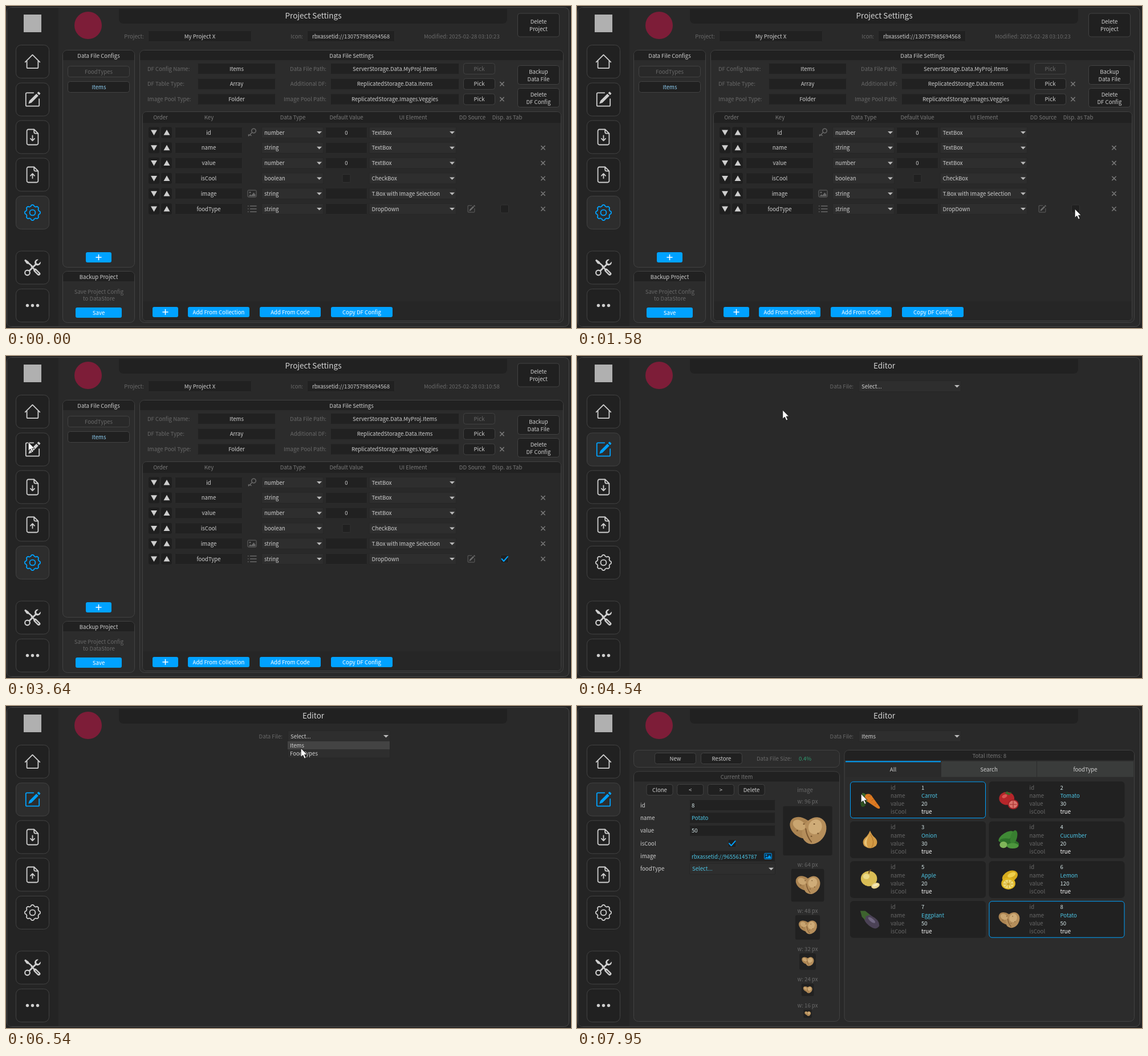
An HTML page for the animation above (7.99 s loop, 991x565 px).

```html
<!DOCTYPE html>
<html lang="en">
<head>
<meta charset="utf-8">
<title>Project editor</title>
<style>
html, body { margin: 0; width: 100%; height: 100%; overflow: hidden; background: #292929; }
svg { display: block; width: 991px; height: 565px; }
text { font-family: "Noto Sans CJK JP", "Noto Sans CJK SC", "Noto Sans CJK KR", "Noto Sans", sans-serif; white-space: pre; }
</style>
</head>
<body>
<svg viewBox="0 0 991 565">
  <g id="scene"></g>
  <path id="cursor" d="M-.8-1V14.5L2.8 11.2 5.5 17.2 8.1 16 5.5 10.2H10.2Z" fill="#fff" stroke="#111" stroke-width=".8"/>
</svg>
<script>
const LOOP = 7990;
const BLUE = '#00a2ff', CYAN = '#4cc4e4', LIGHT = '#cfcfcf', DIM = '#696969', DARK = '#212121', EDGE = '#424242', MENU = '#2e2e2e';
const ROW = 26.8;

// Moments when the interface changes
const CHECKED = 2220, EDITOR = 3890, LIST_OPEN = 5330, HOVER_LIST = 5700, PICKED = 6580, CARDS = 7030;

// Pointer keys: time, x, y
const KEYS = [
  [530, 545, 582], [700, 640, 500], [1000, 800, 402], [1360, 881, 361], [1580, 874, 357], [2220, 874, 357],
  [2480, 862, 385], [2760, 839, 404], [3000, 705, 400], [3300, 340, 230], [3500, 90, 117], [3640, 40, 152],
  [3890, 40, 152], [4200, 165, 146], [4540, 361, 96], [4700, 448, 73], [5000, 515, 52], [5200, 534, 45],
  [5490, 517, 57], [6080, 517, 66], [6240, 517, 66], [6370, 518, 75], [7200, 518, 75], [7550, 511, 116], [7950, 499, 155]
];

const rect = (x, y, w, h, r = 0, fill = 'none', stroke = 'none') =>
  `<rect x="${x}" y="${y}" width="${w}" height="${h}" rx="${r}" fill="${fill}" stroke="${stroke}"/>`;
const text = (x, y, s, fill = LIGHT, anchor = 'middle', size = 9.6) =>
  `<text x="${x}" y="${y + size * .37}" fill="${fill}" text-anchor="${anchor}" font-size="${size}">${s}</text>`;
const left = (x, y, s, fill) => text(x, y, s, fill, 'start');
const line = (d, color = LIGHT, w = 1) =>
  `<path d="${d}" fill="none" stroke="${color}" stroke-width="${w}" stroke-linejoin="round" stroke-linecap="round"/>`;
const shape = (d, fill) => `<path d="${d}" fill="${fill}"/>`;
const oval = (x, y, rx, ry, fill, turn = 0) =>
  `<ellipse rx="${rx}" ry="${ry}" fill="${fill}" transform="translate(${x} ${y}) rotate(${turn})"/>`;
const at = (x, y, body, scale = 1) => `<g transform="translate(${x} ${y}) scale(${scale})">${body}</g>`;
// Icons are drawn on a 16 unit grid
const icon = (x, y, body, scale = 1.8) => at(x - 8 * scale, y - 8 * scale, body, scale);

const field = (x, y, w, s = '', color) =>
  rect(x + .5, y - 9.5, w - 1, 19, 1, DARK, '#2c2c2c') + text(x + w / 2, y, s, color);
const button = (x, y, w, s, h = 20, on = true) =>
  rect(x + .5, y - h / 2 + .5, w - 1, h - 1, 4, on ? '#202020' : '#292929', EDGE) + text(x + w / 2, y, s, on ? LIGHT : DIM);
const blueButton = (x, y, w, s) =>
  rect(x, y - 9, w, 18, 3, BLUE) + (s ? text(x + w / 2, y, s, '#fff') : at(x + w / 2, y, line('M-4.5 0H4.5M0-4.5V4.5', '#fff', 1.6)));
const panel = (x, y, w, h, title, color) =>
  rect(x + .5, y + .5, w - 1, h - 1, 8, '#2c2c2c', EDGE) +
  (title ? shape(`M${x + 1} ${y + 18}v-9q0-8 8-8h${w - 18}q8 0 8 8v9z`, DARK) + text(x + w / 2, y + 10, title, color) : '');
const select = (x, y, w, s, color = LIGHT) =>
  rect(x + .5, y - 9.5, w - 1, 19, 1, MENU, '#262626') + left(x + 5, y, s, color) +
  shape(`M${x + w - 12} ${y - 2}h9l-4.5 4.6z`, '#bbb');
const checkbox = (x, y, on) =>
  rect(x - 7, y - 7, 14, 14, 2, '#202020', '#333') + (on ? at(x, y, line('M-5 0-1.5 4 5.5-4', BLUE, 2)) : '');
const cross = (x, y) => at(x, y, line('M-3.2-3.2 3.2 3.2M3.2-3.2-3.2 3.2', '#7a7a7a', 1.5));

const house = line('M.9 8.5 8 1.4 15.1 8.5M2.5 7.5V13.5a1 1 0 0 0 1 1h9a1 1 0 0 0 1-1V7.5');
const pencil = c => line('M9 1.5H2.5a1 1 0 0 0-1 1v11a1 1 0 0 0 1 1h11a1 1 0 0 0 1-1v-6', c) +
  shape('M12.5 1.7 13.5.65q.35-.3.7 0L15.5 1.94q.3.35 0 .7L14.46 3.7ZM11.75 2.4l2 2L6.94 11.2 4 12.2l.94-3Z', c);
const page = arrow => line('M9.5.5H4A1.5 1.5 0 0 0 2.5 2V14A1.5 1.5 0 0 0 4 15.5h8a1.5 1.5 0 0 0 1.5-1.5V4.5ZM9.5.5V3a1.5 1.5 0 0 0 1.5 1.5h2.5') + line(arrow);
const gear = c => {
  const points = Array.from({ length: 96 }, (_, i) => {
    const a = i * Math.PI / 48;
    const r = 6.9 + Math.max(-.6, Math.min(.6, Math.cos(8 * a)));
    return (8 + r * Math.cos(a)).toFixed(2) + ' ' + (8 + r * Math.sin(a)).toFixed(2);
  });
  return line('M' + points.join('L') + 'Z', c) + `<circle cx="8" cy="8" r="2.75" fill="none" stroke="${c}"/>`;
};
const tools = shape('M1 0 0 1 2.2 4.1Q2.6 4.5 4.1 4.5L7.5 7.5 8.5 6.5 4.5 3Q4.5 2.5 4.1 2.2Z', LIGHT) +
  line('M4 12 11.5 4.5', LIGHT, 1.6) + line('M7 7 10.5 10.5', LIGHT, 1.4) +
  shape('M13.8.1 11.6 2.2 12 4 13.8 4.4 15.9 2.2A3 3 0 1 1 13.8.1Z', LIGHT) +
  oval(3, 13, 3, 3, LIGHT) + oval(3, 13, 1.8, 1.8, DARK) +
  line('M10.7 10.7 14 14', LIGHT, 3.4) + line('M11 11 13.9 13.9', DARK, .7);
const dots = [3, 8, 13].map(x => oval(x, 8, 1.5, 1.5, LIGHT)).join('');
const picture = (c, fill) => rect(-7.5, -6, 15, 12, 1.5, fill, c) + oval(-3.5, -2, 1.4, 1.4, c) + shape('M-6 4.5-3 1-1 3 3-2 6 2V4.5Z', c);
const keyIcon = `<circle cx="3" cy="-3" r="3.8" fill="none" stroke="${DIM}" stroke-width="1.5"/>` + line('M0 0-6 6M-6 6V3.5M-3.5 3.5-1.5 5.5', DIM, 1.5);
const listIcon = [-5, 0, 5].map(y => line(`M-7 ${y}h.5M-3 ${y}H7.5`, DIM, 1.5)).join('');

// Food pictures, each about 40 units wide
const food = {
  Carrot: oval(-11, 1, 6, 12, '#2d4f20', 15) + oval(-8, -5, 4, 10, '#3f6a2a', -40) +
    shape('M-8-10Q0-14 5-5L18 13Q19 18 13 15L-5 3Q-12-3-8-10Z', '#dc7a22') + line('M-3-6 2-9M3 1 7-2M9 9 12 6', '#b85a14'),
  Tomato: oval(-4, -3, 14, 12, '#b5262a') + oval(-8, -7, 5, 3, '#d95550', -25) + shape('M-8-13-3-16 0-13 5-15 1-9-4-11Z', '#3c6b2b') +
    oval(8, 8, 10, 9, '#a32026') + oval(8, 8, 8, 7, '#d8736b') + line('M2 8H14M8 2V14', '#b13a38', 1.5),
  Onion: shape('M0-17Q3-9 9-4 16 3 11 11 0 20-11 11-16 3-9-4-3-9 0-17Z', '#d29a45') +
    shape('M0-12Q-10 3-4 14Q-14 8-9 0Q-5-5 0-12Z', '#e8c477') + line('M1-10Q10 4 3 14', '#a96d27'),
  Cucumber: oval(-5, -6, 16, 7, '#3f8a35', -32) + oval(1, 5, 18, 7, '#2d7029', 12) + oval(9, -5, 6, 13, '#387f30', 15) +
    oval(-10, 9, 7, 6, '#80b65a') + oval(7, 11, 11, 5, '#4d963d'),
  Apple: oval(-2, -2, 15, 14, '#d9bd55') + oval(-7, -6, 6, 5, '#ebda89') + line('M-2-12Q-2-16 1-18', '#6e4b26', 2) +
    oval(10, 11, 8, 5, '#ead691', -20) + oval(10, 10, 5, 2, '#f4e9bd', -20),
  Lemon: oval(2, -6, 15, 10, '#d6ab1d', -25) + oval(5, -9, 8, 4, '#efd04d', -25) + oval(-1, 7, 13, 11, '#e1b721') +
    oval(-1, 8, 10, 8, '#f0db78') + line('M-10 8H8M-1 1V15M-7 3 5 13M5 3-7 13', '#c49a1c'),
  Eggplant: shape('M-16-14Q-6-14 4-6 18 1 17 12 11 21-1 12-10 5-12-4Z', '#4b4256') + oval(3, 1, 8, 3, '#706781', 38) +
    shape('M-18-16-9-16 0-9-8-6-9 1-15-5Z', '#3d632e'),
  Potato: oval(-6, -2, 14, 10, '#ab8452', 35) + oval(7, 1, 12, 15, '#b58e5b', 32) + oval(-9, -5, 7, 5, '#c9a570', 30) + oval(8, -3, 7, 8, '#cfac78', 25) +
    line('M-2-1Q-1 7 4 13', '#7b5731', 1.2) + [[-11, 1], [-4, -6], [7, -6], [11, 4], [4, 7]].map(p => oval(...p, .9, .7, '#76552f')).join('')
};
const items = [['Carrot', 20], ['Tomato', 30], ['Onion', 30], ['Cucumber', 20], ['Apple', 20], ['Lemon', 120], ['Eggplant', 50], ['Potato', 50]];

function frame(editing) {
  const nav = (y, body, on) => rect(17.5, y - 29, 58, 58, 9, on ? '#2d2d2d' : DARK, EDGE) + icon(46.5, y, body);
  return rect(0, 0, 991, 565, 0, '#242424') + rect(1.5, 2.5, 986, 560, 8, '#292929', '#4b4b4b') +
    shape('M2 10Q2 3 9 3H92V562H9Q2 562 2 555Z', '#242424') + rect(31, 15, 31, 31, 0, '#b0b0b0') + oval(144, 34, 24, 24, '#7d1d38') +
    shape('M198 5H879V22Q879 31 870 31H207Q198 31 198 22Z', DARK) +
    text(539, 17, editing ? 'Editor' : 'Project Settings', '#d4d4d4', 'middle', 13.5) +
    nav(97.5, house) + nav(164, pencil(editing ? BLUE : LIGHT), editing) +
    nav(230, page('M8 6.5V11M6 9.5 8 11.5 10 9.5')) + nav(296, page('M8 11.5V7M6 9 8 7 10 9')) +
    nav(362.5, gear(editing ? LIGHT : BLUE), !editing) + nav(459, tools) + nav(525.5, dots);
}

function settings(checked) {
  const rows = [
    ['id', 'number', '0', 'TextBox', keyIcon], ['name', 'string', '', 'TextBox'], ['value', 'number', '0', 'TextBox'],
    ['isCool', 'boolean', null, 'CheckBox'], ['image', 'string', '', 'T.Box with Image Selection', picture(DIM, 'none')],
    ['foodType', 'string', '', 'DropDown', listIcon]
  ];
  const files = [
    ['DF Config Name:', 'Items', 'Data File Path:', 'ServerStorage.Data.MyProj.Items'],
    ['DF Table Type:', 'Array', 'Additional DF:', 'ReplicatedStorage.Data.Items'],
    ['Image Pool Type:', 'Folder', 'Image Pool Path:', 'ReplicatedStorage.Images.Veggies']
  ];
  const twoLines = (y, a, b) => button(897, y, 74, '', b === 'Project' ? 42 : 34) + text(934, y - 6, a) + text(934, y + 7, b);
  const heads = [[271, 'Order'], [356, 'Key'], [503, 'Data Type'], [597, 'Default Value'], [714, 'UI Element'], [818, 'DD Source'], [879, 'Disp. as Tab']];
  return text(242, 53, 'Project:', DIM, 'end') + field(249, 53, 182, 'My Project X') +
    text(521, 53, 'Icon:', DIM, 'end') + field(528, 53, 154, 'rbxassetid://130757985694568') +
    left(733, 53, 'Modified: 2025-02-28 03:10:' + (checked ? 58 : 23), DIM) + twoLines(33.5, 'Delete', 'Project') +
    panel(99, 77, 127, 382, 'Data File Configs') + button(108, 115, 109, 'FoodTypes', 20, false) +
    button(108, 142, 109, '') + text(163, 142, 'Items', '#8fd0f5') + blueButton(140, 441, 45) +
    panel(99, 465, 127, 91, 'Backup Project') + text(163, 501, 'Save Project Config', DIM) + text(163, 513.5, 'to DataStore', DIM) + blueButton(122, 538, 81, 'Save') +
    panel(234, 77, 744, 479, 'Data File Settings') +
    files.map(([label, value, pathLabel, path], i) => {
      const y = 110 + i * ROW;
      return left(248, y, label, DIM) + field(336, y, 137, value) + text(562, y, pathLabel, DIM, 'end') + field(569, y, 226, path) +
        button(802, y, 56, 'Pick', 20, i > 0) + (i ? cross(870, y) : '');
    }).join('') +
    twoLines(121, 'Backup', 'Data File') + twoLines(161, 'Delete', 'DF Config') +
    rect(239.5, 185.5, 734, 367, 7, '#292929', EDGE) + shape('M240 205V193Q240 186 247 186H966Q973 186 973 193V205Z', DARK) +
    shape('M240 518H973V545Q973 552 966 552H247Q240 552 240 545Z', '#262626') +
    heads.map(([x, s]) => text(x, 195, s, '#7b7b7b')).join('') +
    rows.map(([key, type, value, ui, mark], i) => {
      const y = 222 + i * ROW;
      return rect(250, y - 9.5, 19, 19, 3, '#1f1f1f') + rect(272, y - 9.5, 19, 19, 3, '#1f1f1f') +
        at(259.5, y, shape('M-5.5-4.5H5.5L0 5Z', LIGHT)) + at(282, y, shape('M-5.5 4.5H5.5L0-5Z', LIGHT)) +
        field(296, y, 119, key) + (mark ? at(431.5, y, mark) : '') + select(448, y, 109, type) +
        (value === null ? checkbox(597, y) : field(560, y, 74, value)) + select(636.5, y, 153.5, ui) + (i ? cross(942, y) : '');
    }).join('') +
    icon(816, 356, pencil(DIM), .9) + checkbox(874.5, 356, checked) +
    blueButton(257, 537, 45) + blueButton(319, 537, 108, 'Add From Collection') + blueButton(445, 537, 107, 'Add From Code') + blueButton(570, 537, 108, 'Copy DF Config');
}

function currentItem() {
  const labels = ['id', 'name', 'value', 'isCool', 'image', 'foodType'];
  const rowY = i => 174 + i * 22.35;
  const input = (i, s, color) => field(197, rowY(i), 151) + left(201, rowY(i), s, color);
  const sizes = [[96, 167, 219], [64, 278, 314.5], [48, 359, 388.5], [32, 426, 448.5], [24, 479, 498], [16, 525, 540]];
  return panel(99, 77, 362, 31) + button(136, 92, 73, 'New') + button(217, 92, 73, 'Restore') +
    left(315, 92, 'Data File Size:', DIM) + left(389, 92, '0.4%', '#2f9a70') +
    panel(99, 114.5, 362, 439.5, 'Current Item', '#777') +
    ['Clone', '&lt;', '&gt;', 'Delete'].map((s, i) => button(121.5 + i * 53.7, 147, 47, s)).join('') +
    labels.map((s, i) => left(111, rowY(i), s)).join('') +
    input(0, '8', '#d5e6e8') + input(1, 'Potato', CYAN) + input(2, '50', '#d5e6e8') + checkbox(272, rowY(3), true) +
    field(197, rowY(4), 151) + `<svg x="197" y="254" width="120" height="20" style="width:120px;height:20px">${left(4, 10, 'rbxassetid://96556145787', CYAN)}</svg>` +
    at(335, 263.5, picture(BLUE, '#0b3350'), .85) + select(197, rowY(5), 151, 'Select...', CYAN) +
    text(400, 147, 'image', DIM) +
    sizes.map(([w, labelY, y]) => text(404.5, labelY, `w: ${w} px`, DIM) +
      rect(404.5 - w * .45, y - w * .45, w * .9, w * .9, w > 30 ? 3 : 2, DARK) + at(404.5, y - w * .02, food.Potato, w / 58)).join('');
}

function itemList(ready, hoverFirst) {
  const tab = (x, w, s, on) => rect(x, 97, w, 27.5, 0, on ? '#2a2a2a' : '#3a3c3b') + (on ? rect(x, 96.5, w, 2, 0, BLUE) : '') + text(x + w / 2, 111, s);
  const card = ([name, value], i) => {
    const x = i % 2 ? 722.5 : 479, y = 133 + (i >> 1) * 69.9;
    const pairs = [['id', i + 1, '#d5e6e8'], ['name', name, CYAN], ['value', value, '#d5e6e8'], ['isCool', 'true', '#fff']];
    return rect(x + .5, y, 237, 63.5, 5, DARK, i === 7 || (i === 0 && hoverFirst) ? BLUE : DARK) + at(x + 35, y + 32, food[name], .95) +
      pairs.map(([k, v, c], n) => left(x + 71, y + 10 + n * 14.3, k, DIM) + left(x + 125, y + 10 + n * 14.3, v, c)).join('');
  };
  return panel(468.5, 77, 509.5, 477, 'Total Items: 8', '#777') +
    tab(471, 167, 'All', ready) + tab(639, 167, 'Search') + tab(807, 169, 'foodType') + (ready ? items.map(card).join('') : '');
}

function editor(t, pointerY) {
  const picked = t >= PICKED;
  let out = text(485, 53, 'Data File:', DIM, 'end') + select(494, 53, 180, picked ? 'Items' : 'Select...');
  if (t >= LIST_OPEN && !picked)
    out += rect(494.5, 62.5, 179, 28.5, 0, MENU, '#262626') + (t >= HOVER_LIST ? rect(494, 62, 179, 14, 0, '#434343') : '') +
      left(498, 69, 'Items') + left(498, 83.5, 'FoodTypes');
  if (picked) out += currentItem() + itemList(t >= CARDS, pointerY >= 133);
  return out;
}

// Smooth curve through the keys, at rest where a key repeats its place
function pointer(t) {
  const last = KEYS.length - 1;
  if (t <= KEYS[0][0]) return KEYS[0].slice(1);
  if (t >= KEYS[last][0]) return KEYS[last].slice(1);
  const i = KEYS.findIndex(k => k[0] > t) - 1;
  const same = (a, b) => a[1] === b[1] && a[2] === b[2];
  const slope = (n, axis) => {
    const a = KEYS[n - 1], k = KEYS[n], b = KEYS[n + 1];
    return !a || !b || same(a, k) || same(k, b) ? 0 : (b[axis] - a[axis]) / (b[0] - a[0]);
  };
  const a = KEYS[i], b = KEYS[i + 1], span = b[0] - a[0], u = (t - a[0]) / span, v = 1 - u;
  return [1, 2].map(n => v * v * (1 + 2 * u) * a[n] + u * u * (3 - 2 * u) * b[n] +
    span * u * v * (v * slope(i, n) - u * slope(i + 1, n)));
}

const scene = document.getElementById('scene'), cursor = document.getElementById('cursor');
let shown = '';
function draw() {
  const t = performance.now() % LOOP, [x, y] = pointer(t), editing = t >= EDITOR;
  const markup = frame(editing) + (editing ? editor(t, y) : settings(t >= CHECKED));
  if (markup !== shown) scene.innerHTML = shown = markup;
  cursor.setAttribute('transform', `translate(${x} ${y})`);
  requestAnimationFrame(draw);
}
draw();
</script>
</body>
</html>
```
